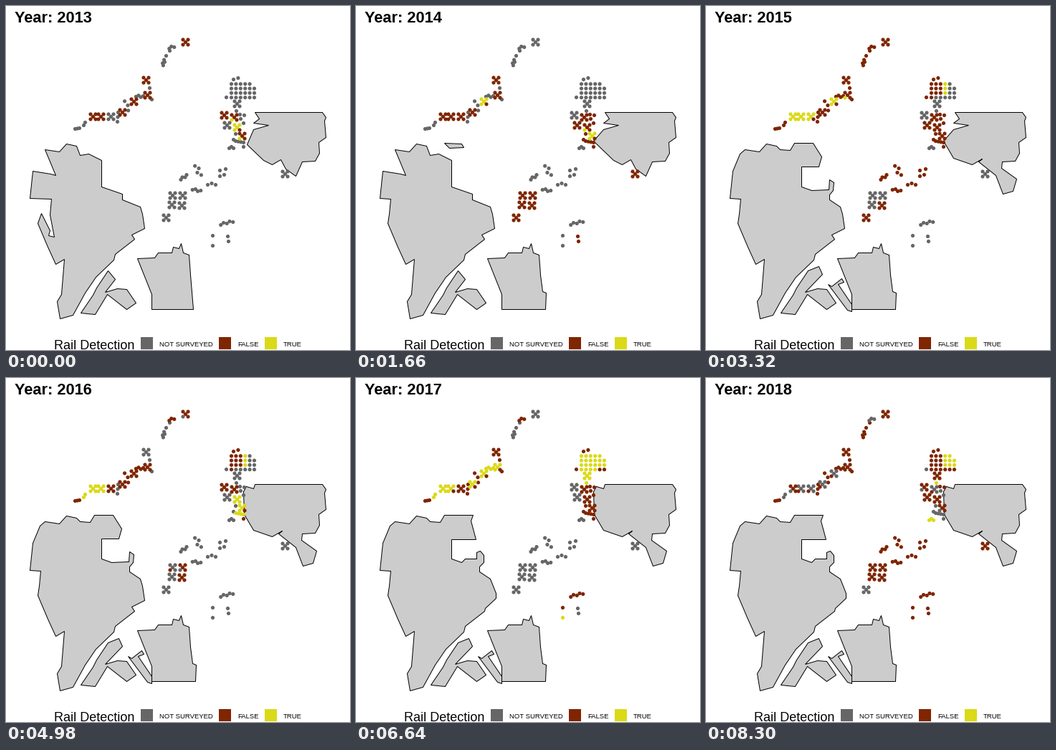
Recreate the animation shown at these times as a matplotlib script. Size 480 px wide and 480 px high, loop 9960 ms.

```python
import numpy as np
import matplotlib.pyplot as plt
from matplotlib.animation import FuncAnimation
from matplotlib.patches import Polygon, Rectangle

SIZE, DPI = 480, 100
PX = 72 / DPI
YEARS = range(2013, 2019)
COLORS = {"N": "#666666", "F": "#7f2500", "T": "#dada18"}

# Lower case: plots whose five sites differ (centre, NW, NE, SW, SE).
MIXED = {"t": "TTTTF", "f": "FFFTF", "n": "NNNFN", "g": "FFFNF"}

# Centre of each cross of sites and its results, one letter per year.
CROSSES = [
    (250, 50, "FNFgNF"), (195, 103, "FFFNFF"), (197, 124, "FFfFtF"),
    (178, 133, "FttFtn"), (162, 148, "FFFFtn"), (146, 154, "NFtFFn"),
    (132, 154, "FFTTtn"), (121, 154, "FFTTTg"), (322, 136, "NNNNTF"),
    (304, 152, "FNNFNg"), (318, 155, "fFFFFn"), (308, 166, "NFFNNF"),
    (322, 169, "tfFTFF"), (329, 181, "ftFtFg"), (389, 234, "NFNNNF"),
    (232, 264, "NFNnNF"), (246, 264, "NFNgNF"), (231, 277, "NFNNNF"),
    (245, 278, "NFFFNF"), (223, 295, "NFFNNN"),
]

# Zigzag rows of sites: start, end, count, sideways swing, results.
TRAILS = [
    ((218, 82), (221, 75), 4, 1, "NNFNNF"),
    ((223, 69), (228, 62), 2, 0, "NNFNNF"),
    ((227, 58), (234, 56), 3, 1, "NNFFFN"),
    ((200, 114), (203, 130), 2, 0, "NNFNFF"),
    ((181, 125), (191, 126), 4, 1, "NNFFTF"),
    ((166, 132), (171, 145), 3, 1, "NNFFFF"),
    ((156, 148), (155, 161), 3, 0, "NNFNFF"),
    ((110, 162), (108, 166), 2, 0, "NNFTTN"),
    ((102, 170), (96, 171), 3, 0, "NNFFFF"),
    ((321, 146), (321, 146), 1, 0, "NNNNTT"),
    ((326, 151), (332, 152), 2, 0, "NFFNFF"),
    ((327, 157), (331, 163), 2, 0, "NFFNFN"),
    ((320, 178), (317, 186), 2, 0, "NFFNFN"),
    ((320, 188), (331, 190), 4, 0, "NFFTFN"),
    ((331, 196), (331, 196), 1, 0, "NFFFFN"),
    ((311, 197), (317, 197), 3, 1, "NNNNNT"),
    ((243, 241), (252, 236), 4, 1, "NNFNNF"),
    ((265, 222), (270, 236), 4, 2, "NNFNNF"),
    ((260, 255), (271, 258), 4, 1, "NNFNNF"),
    ((281, 248), (292, 248), 3, 1, "NNFNNF"),
    ((298, 229), (306, 227), 2, 0, "NNFNNF"),
    ((298, 237), (304, 235), 2, 0, "NNFNNF"),
    ((299, 304), (316, 300), 5, 1, "NNNNFF"),
    ((288, 320), (288, 320), 1, 0, "NNNNFF"),
    ((288, 334), (288, 334), 1, 0, "NNNNTF"),
    ((309, 321), (310, 328), 2, 0, "NFNNNF"),
]

# Coast pieces that stay the same, and those that change between years.
HEAD = [(33, 268), (37, 230)]
WEST_CAPE = [(54, 200), (74, 203), (84, 192), (98, 195)]
EAST_CAPE = [(103, 208), (115, 206), (133, 215), (133, 252), (162, 262)]
NOTCH = [(103, 200), (117, 201), (123, 191), (149, 191), (161, 210),
         (157, 224), (133, 224), (133, 252), (147, 257), (171, 256),
         (172, 242), (178, 246), (177, 257)]
HOOK = NOTCH[:4] + [(163, 191), (160, 199), (167, 225), (133, 225),
                    (133, 252), (147, 257), (152, 252), (168, 252),
                    (168, 243), (173, 241), (178, 247), (178, 257)]
SHORE = [(172, 263), (172, 270), (187, 280)]
POINT = [(190, 290), (193, 310), (175, 319)]
WIDE_POINT = [(195, 300), (195, 307), (180, 321)]
SOUTH = [(179, 325), (152, 346), (150, 354), (125, 378), (110, 400),
         (93, 431), (75, 436), (71, 412), (77, 402), (81, 353), (69, 360),
         (58, 336), (44, 303)]
INLET = [(49, 289), (61, 313), (59, 320), (67, 322), (61, 291), (63, 269)]
BAY = [(46, 290), (48, 269)]
ISLET = [(123, 191), (147, 192), (150, 197), (130, 198)]
FORK = [(138, 399), (155, 394), (168, 395), (181, 414), (168, 423),
        (141, 402), (124, 430), (104, 428), (121, 403), (126, 393)]
SPIT = [(170, 388), (175, 391), (189, 380), (192, 385), (184, 388),
        (203, 416), (203, 426), (197, 424)]
BLOCK = [(203, 423), (203, 402), (183, 352), (207, 351), (212, 344),
         (231, 344), (233, 336), (241, 338), (244, 331), (247, 344),
         (255, 347), (257, 375)]
EAST_TOP = [(347, 148), (441, 148), (446, 155), (444, 160), (446, 183),
            (436, 190), (437, 205), (431, 216), (413, 217)]
ROUND = [(404, 237), (390, 227), (383, 214), (371, 221), (359, 215)]
LOBE = [(412, 226), (433, 241), (428, 258), (414, 262), (404, 236),
        (380, 217), (385, 213), (371, 221), (345, 212)]
COVE = [(345, 172), (366, 166), (345, 163), (353, 157)]


def land(i):
    """Polygons of one year."""
    early, late = i < 2, i > 3
    west = (HEAD + ([(62, 234), (69, 236)] if early else [(47, 206)])
            + WEST_CAPE + (EAST_CAPE if early else HOOK if late else NOTCH)
            + ([(162, 270)] + SHORE[2:] if early else SHORE)
            + (WIDE_POINT if late else POINT) + SOUTH + (BAY if i else INLET))
    fork = [(142, 369)] + ([(152, 381)] if early else [(157, 363), (162, 374)])
    block_end = [(260, 398), (265, 400), (264, 423)] if i else [(261, 423)]
    if i == 0:
        cove = [(336, 193)] + COVE
    elif i < 3:
        cove = [(331, 188)] + COVE
    else:
        cove = [(332, 190), (331, 158), (335, 151), (345, 154)]
    shapes = [west, fork + FORK, BLOCK + block_end,
              EAST_TOP + (ROUND if early else LOBE) + cove]
    if i:
        shapes.append(ISLET if i == 1 else SPIT)
    return shapes


def cross(x, y, results, d=3.5):
    years = [MIXED.get(r, r * 5) for r in results]
    spots = [(0, 0), (-d, -d), (d, -d), (-d, d), (d, d)]
    return [(x + dx, y + dy, "".join(r[k] for r in years))
            for k, (dx, dy) in enumerate(spots)]


def trail(start, end, count, swing, results):
    a, b = np.array(start), np.array(end)
    side = np.array([a[1] - b[1], b[0] - a[0]])
    side = swing * side / max(np.hypot(*side), 1)
    return [(*(a + (b - a) * k / max(count - 1, 1) + side * (-1) ** k), results)
            for k in range(count)]


def colony():
    """Rounded grid of sites in the north-east."""
    found = []
    for row in range(5):
        for col in range(6):
            x, y = 314 + 6.4 * col, 102 + 6.3 * row
            if row == 0:
                x, y = x + 3, y - 2 * (col == 1)
            if col + 2 * (row == 0) > 3 + min(row, 2):
                continue
            if col > 3:
                result = "NNNNTT" if row < 4 else "NNNNFF"
            elif row == 0:
                result = "NNFFFF"
            elif row == 4:
                result = "NNNNTF" if col else "NNFFTF"
            else:
                result = "NNTTTT" if col == 3 else "NNFFTF"
            found.append((x, y, result))
    return found + [(307, 127, "NNFNFN")]


sites = colony()
for args in TRAILS:
    sites += trail(*args)
for args in CROSSES:
    sites += cross(*args)

fig = plt.figure(figsize=(SIZE / DPI, SIZE / DPI), dpi=DPI, facecolor="white")
ax = fig.add_axes([0, 0, 1, 1])
ax.set_xlim(-0.5, SIZE - 0.5)
ax.set_ylim(SIZE - 0.5, -0.5)
ax.axis("off")


def label(x, y, text, px, **kw):
    return ax.text(x, y, text, fontsize=px * PX, family="Liberation Sans",
                   va="baseline", **kw)


patches = [Polygon([(0, 0), (1, 0), (1, 1)], closed=True, facecolor="#cccccc",
                   edgecolor="black", linewidth=PX, zorder=1)
           for _ in range(5)]
for patch in patches:
    ax.add_patch(patch)
dots = ax.scatter([s[0] for s in sites], [s[1] for s in sites],
                  s=(5.2 * PX) ** 2, linewidths=0, zorder=2)

title = label(11.5, 22.5, "", 21.8, weight="bold")
label(66.5, 478.5, "Rail Detection", 18)
for x, key, name in [(188, "N", "NOT SURVEYED"), (297, "F", "FALSE"),
                     (361, "T", "TRUE")]:
    ax.add_patch(Rectangle((x - 0.5, 461.5), 17, 17, color=COLORS[key],
                           linewidth=0))
    label(x + 25.5, 474.5, name, 9.5)


def draw(i):
    shapes = land(i)
    for k, patch in enumerate(patches):
        patch.set_visible(k < len(shapes))
        if k < len(shapes):
            patch.set_xy(shapes[k])
    dots.set_facecolor([COLORS[s[2][i]] for s in sites])
    title.set_text(f"Year: {YEARS[i]}")
    return [*patches, dots, title]


anim = FuncAnimation(fig, draw, frames=len(YEARS), interval=1660, repeat=True,
                     repeat_delay=0, blit=False)
plt.show()
```
